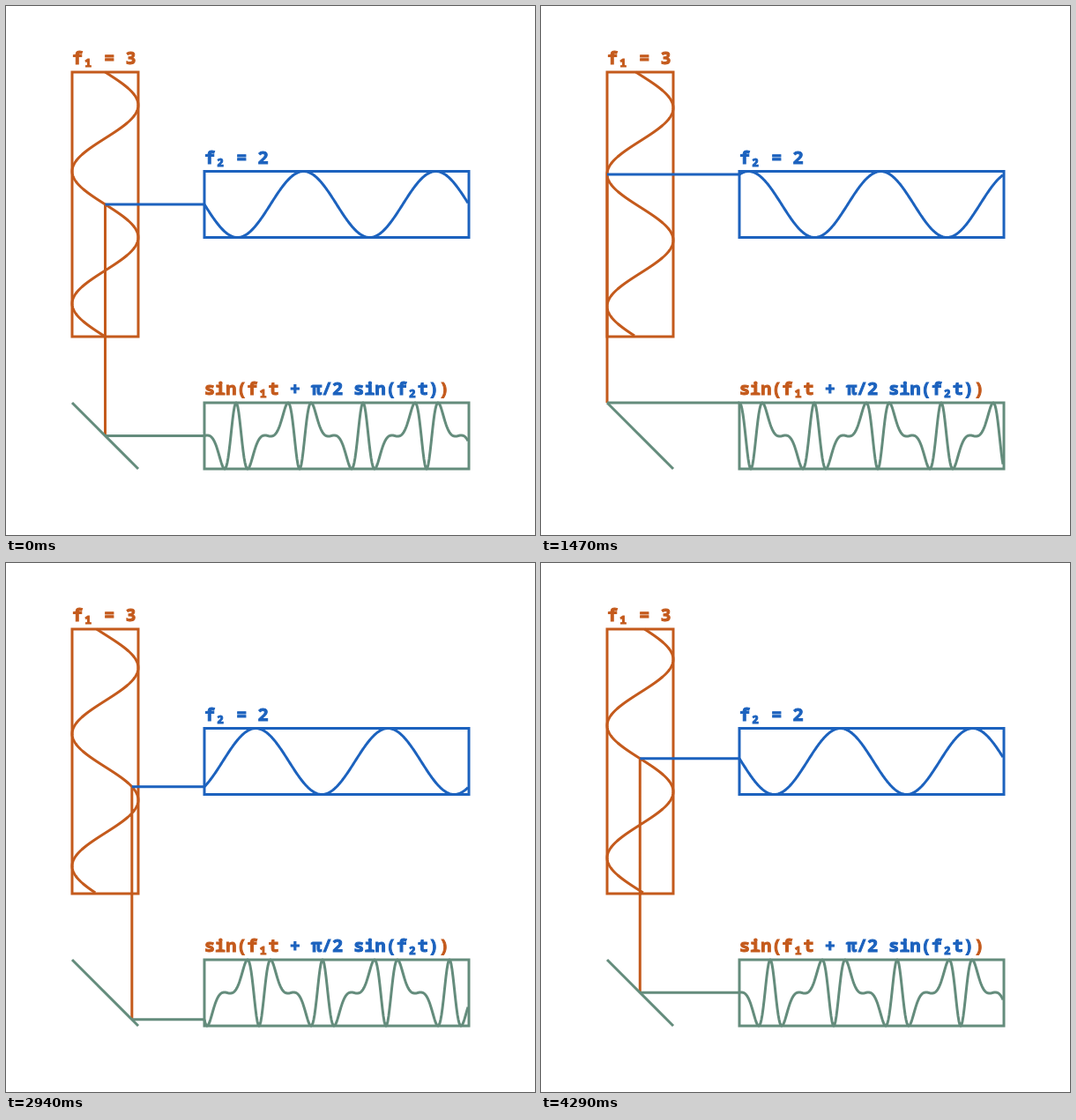
Animation of 600x600 px, one loop 4.32 s. Source, as an HTML page:

```html
<!DOCTYPE html>
<html lang="en">
<head>
<meta charset="utf-8">
<title>Phase modulation</title>
<style>
  html, body { margin: 0; width: 100%; height: 100%; overflow: hidden; background: #fff; }
  svg { display: block; width: 600px; height: 600px; }
  path, rect { fill: none; stroke-width: 3; stroke-linejoin: round; }
  rect { stroke-linejoin: miter; }
  text { font: bold 20.16px "Noto Sans Mono", "DejaVu Sans Mono", monospace; white-space: pre; }
  .carrier { stroke: #c45a1c; }
  .mod { stroke: #1c62be; }
  .out { stroke: #648c7c; }
  text, tspan { stroke: none; }
  text.carrier { fill: #c45a1c; }
  .mod { fill: #1c62be; }
</style>
</head>
<body>
<svg viewBox="0 0 600 600">
  <rect class="carrier" x="75" y="75" width="75" height="300"/>
  <path class="carrier" id="carrier"/>
  <rect class="mod" x="225" y="187.5" width="300" height="75"/>
  <path class="mod" id="mod"/>
  <rect class="out" x="225" y="450" width="300" height="75"/>
  <path class="out" id="out"/>
  <path class="out" d="M75 450L150 525"/>
  <text class="carrier" x="75" y="66">f₁ = 3</text>
  <text class="mod" x="225" y="178.5">f₂ = 2</text>
  <text class="carrier" x="225" y="440.5">sin(f₁t <tspan class="mod">+ π/2 sin(f₂t)</tspan>)</text>
</svg>
<script>
const TAU = 2 * Math.PI, STEPS = 144, STEP_MS = 30, AMP = 37.5, F1 = 3, F2 = 2;
const { sin, PI } = Math;
const signal = a => sin(PI / 2 * sin(F2 * a) - F1 * a);

// Polyline through 300 samples, one per pixel
const curve = point =>
  "M" + Array.from({ length: 300 }, (_, i) => point(i).map(v => v.toFixed(2)).join(" ")).join("L");
const setPath = (id, d) => document.getElementById(id).setAttribute("d", d);

function draw(now) {
  const a = TAU * (Math.floor(now / STEP_MS) % STEPS) / STEPS;
  const x = 112.5 + AMP * signal(a);
  const y = 225 + AMP * sin(F2 * a);
  const mirrorY = x + 375;

  setPath("carrier", curve(i => [112.5 + AMP * sin(TAU * i / 150 - F1 * a), 75 + i])
    + `M${x} ${y}V${mirrorY}`);
  setPath("mod", curve(i => [225 + i, 225 + AMP * sin(TAU * i / 150 + F2 * a)])
    + `M${x} ${y}H225`);
  // The output scrolls one pixel per step
  setPath("out", curve(i => [225 + i, 487.5 + AMP * signal(a - TAU * i / STEPS)])
    + `M${x} ${mirrorY}H225`);
}

const start = performance.now();
function tick() {
  draw(performance.now() - start);
  requestAnimationFrame(tick);
}
tick();
</script>
<style>
  path.mod, rect.mod { fill: none; }
</style>
</body>
</html>
```
